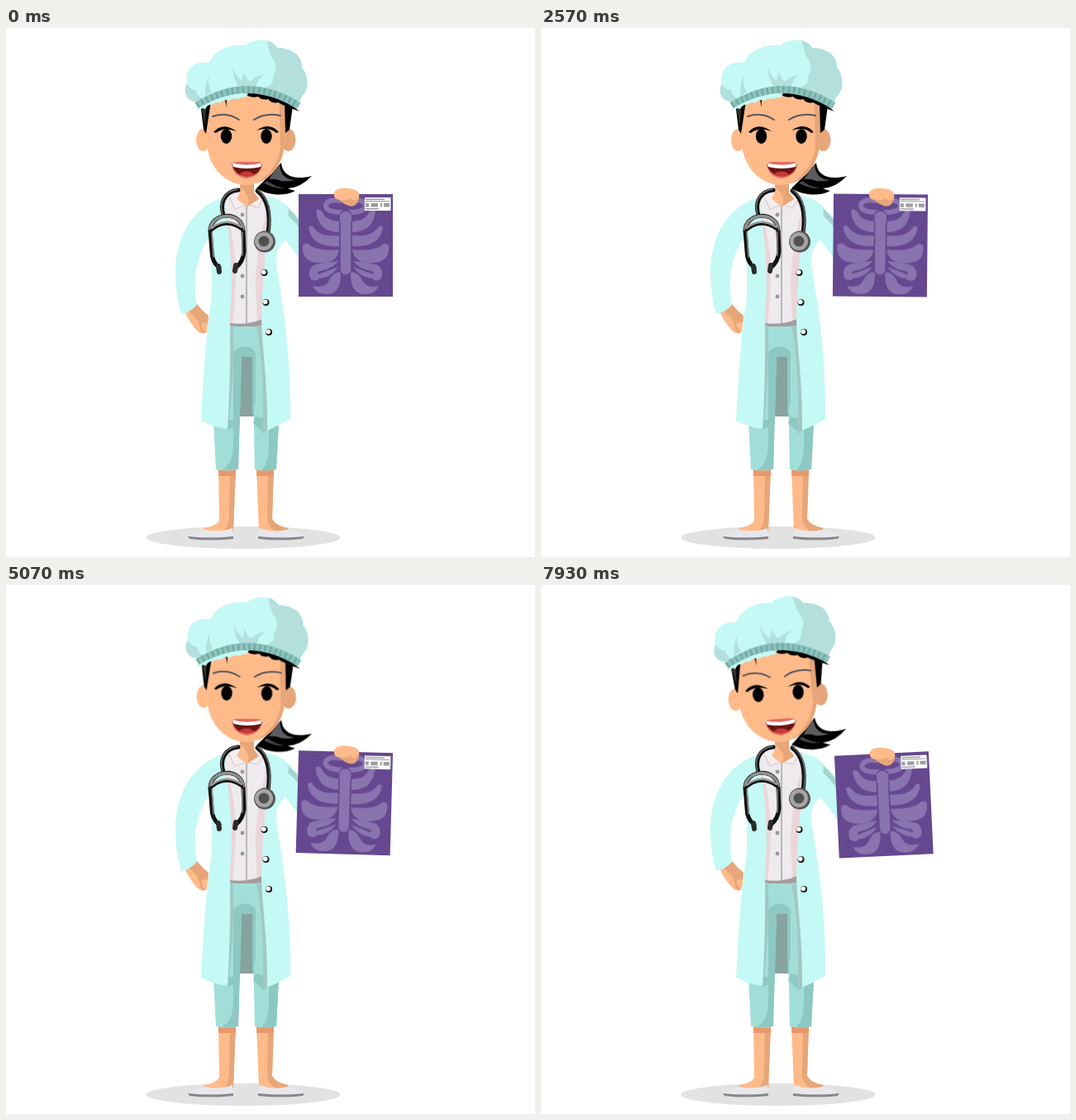
These frames come from a looping animation (640x640 px, 8000 ms). An HTML page without scripts:

```html
<!DOCTYPE html>
<html lang="en">
<head>
<meta charset="utf-8">
<title>Doctor with X-ray</title>
<style>
  html, body { margin: 0; width: 100%; height: 100%; overflow: hidden; background: #fff; }
  svg { display: block; width: 100vw; height: 100vh; }

  .skin { fill: #ffba8a; }
  .skin-dark { fill: #e6a679; }
  .coat { fill: #c4f9f5; }
  .coat-dark { fill: #a2c8c4; }
  .hat-dark { fill: #b3e0dc; }
  .pants { fill: #a2ded8; }
  .pants-dark { fill: #8dc8c2; }
  .line { fill: none; stroke-linecap: round; stroke-linejoin: round; }

  .head, .hold, .film { animation: 8s ease-in-out infinite; }
  .head { transform-origin: 290px 190px; animation-name: nod; }
  .hold { animation-name: lift; }
  .film { transform-origin: 411px 203px; animation-name: sway; }

  @keyframes nod {
    0% { transform: rotate(0deg); }
    18% { transform: rotate(-.55deg); }
    32% { transform: rotate(0deg); }
    53.6% { transform: rotate(.8deg); }
    66% { transform: rotate(.5deg); }
    84% { transform: rotate(-3.8deg); }
    100% { transform: rotate(-3.7deg); }
  }
  @keyframes lift {
    0% { transform: translate(0, 0); }
    14.5% { transform: translate(0, -3px); }
    30% { transform: translate(0, 0); }
    53.6% { transform: translate(0, 1px); }
    72.4% { transform: translate(0, .5px); }
    76% { transform: translate(0, 2.5px); }
    83% { transform: translate(0, -.5px); }
    92% { transform: translate(1px, -1px); }
    99.1%, 100% { transform: translate(1px, 3px); }
  }
  @keyframes sway {
    0% { transform: rotate(0deg); }
    13.5% { transform: rotate(-4.7deg); }
    31% { transform: rotate(.5deg); }
    40% { transform: rotate(1.2deg); }
    53.6% { transform: rotate(.5deg); }
    72.4% { transform: rotate(2.5deg); }
    76% { transform: rotate(3.6deg); }
    83% { transform: rotate(2.3deg); }
    94% { transform: rotate(-5.2deg); }
    99.1%, 100% { transform: rotate(-2.7deg); }
  }
</style>
</head>
<body>
<svg viewBox="0 0 640 640">
  <defs>
    <clipPath id="face-clip">
      <path d="M241 94C241 115 242 132 244 148C249 174 270 190 290 190C311 190 331 174 336 148C339 132 340 115 341 94C310 76 272 76 241 94Z"/>
    </clipPath>
    <clipPath id="mouth-clip">
      <path d="M273 163Q291 168 310 163Q308 178 291 179.500Q276 178 273 163Z"/>
    </clipPath>
    <clipPath id="hat-clip">
      <path id="hat" d="M231 96Q232 92 229 89C217 87 214 77 219 66C216 50 229 39 246 42C252 26 272 19 290 21C299 13 321 11 328 24C346 24 359 34 358 48C366 57 366 72 361 79Q355 85 353 96Q292 56 231 96Z"/>
    </clipPath>
    <g id="ribs">
      <path d="M404 209C392 206 386 212 387 216C389 222 398 223 407 223" class="line" stroke="#8a74b0" stroke-width="6"/>
      <g fill="#8a74b0">
        <path d="M375 221Q379 217 383 223Q388 234 405 234V247Q378 248 375 221Z"/>
        <path d="M366 241Q370 237 374 244Q382 253 404 251V264Q369 266 366 241Z"/>
        <path d="M359 263Q364 258 369 264Q380 270 403 268Q401 283 384 284Q357 286 359 263Z"/>
        <path d="M402 282Q385 283 372 287Q364 293 368 303Q374 308 379 303Q393 302 402 289Q391 293 378 298Q375 294 384 293Q395 291 402 282Z"/>
        <path d="M371 312Q386 316 391 305Q396 295 405 295Q406 322 388 322Q375 322 371 312Z"/>
      </g>
    </g>
  </defs>

  <ellipse cx="287" cy="616.500" rx="117.500" ry="13.500" fill="#e2e2e2"/>

  <!-- legs and shoes -->
  <g>
    <path class="skin" d="M257 533H278L275 609H239V605Q254 603 258 596Z"/>
    <path class="skin-dark" d="M271 533H278L275 609H264Q270 600 270 590Z"/>
    <path class="skin" d="M303 533H324L322 594Q326 602 341 605V609H306Z"/>
    <path class="skin-dark" d="M317 533H324L322 594Q326 602 341 605V609H326Q316 603 316 592Z"/>
    <path d="M257 533H278V542H257ZM303 533H324V542H303Z" fill="#e9986d"/>
    <path d="M221 615Q224 611 241 607Q258 611 274 605L275 617H221ZM360 615Q357 611 340 607Q323 611 306 605L305 617H360Z" fill="#e8e8ec"/>
    <path d="M220 615Q248 618 275 615V618Q247 621 222 618ZM361 615Q333 618 305 615V618Q333 621 359 618Z" fill="#86868a"/>
  </g>

  <!-- trousers -->
  <path d="M278 390H302V470H278Z" fill="#87a3a0"/>
  <path class="pants" d="M268 358H312L330 478L327 534Q314 537 301 534L298 398H285L281 534Q267 537 254 534L251 476L266 430Z"/>
  <path class="pants-dark" d="M275 420V396C276 382 302 382 302 396V450L298 470V398H285L281 534L261 535C272 528 274 520 275 505ZM330 478L327 534Q319 536 309 535C320 526 318 500 318 480Z"/>
  <path d="M250 477L268 486L283 480V474H252ZM330 477L312 490L299 478L302 470Z" class="pants-dark"/>

  <!-- raised arm -->
  <path class="coat" d="M318 204Q333 206 345 220L410 285L378 310L334 251Z"/>
  <path d="M337 215Q347 222 362 242V252Q350 234 340 226Z" fill="#a5d2cd"/>

  <!-- hand on hip -->
  <path class="skin" d="M216 343L231 334Q238 343 245 348L243 368Q237 372 231 366Q222 356 216 343Z"/>
  <path class="skin-dark" d="M218 341L231 334Q238 343 245 348L244 357Q238 354 236 360L241 369Q237 370 235 365Q234 350 218 341Z"/>

  <!-- shirt and neck -->
  <path d="M264 202H316L311 360H269Z" fill="#edebed"/>
  <path d="M264 212Q276 250 278 290Q278 325 274 360H268ZM315 222Q302 275 302 310L304 358H312Z" fill="#ebd5d8"/>
  <path d="M270 357Q292 360 310 352V361H270Z" fill="#a59b9d"/>
  <path d="M291 214V358" stroke="#aaa4a8" stroke-width="1.500"/>
  <g fill="#99979b">
    <circle cx="286" cy="226" r="2.400"/><circle cx="286" cy="300" r="2.400"/><circle cx="286" cy="325" r="2.400"/>
  </g>
  <path d="M282 196L270 203L277 219L291 214L305 217L313 203L300 196Z" fill="#f3edf0"/>
  <path d="M270 205L277 219L291 214L305 217L312 205" class="line" stroke="#ddc8cd" stroke-width="1.200"/>
  <path class="skin" d="M283 184H300V199Q304 204 306 207Q299 211 292 216Q283 211 279 206Q283 202 283 196Z"/>
  <path class="skin-dark" d="M283 184H300V199L306 207L292 216Q297 203 283 193Z"/>

  <!-- coat -->
  <path class="coat-dark" d="M269 360H275Q277 425 268 487ZM303 360H312L319 485L310 491Q314 420 303 360Z"/>
  <path class="coat" d="M264 205C232 213 204 247 205 298Q205 322 212 346Q222 345 231 335C226 310 228 280 246 252Q250 290 249 325C241 375 239 425 236 475Q251 483 268 485Q272 420 271 345C276 300 270 250 264 205Z"/>
  <path class="coat" d="M316 203Q331 206 342 220L338 256Q325 268 327 286C336 340 345 400 344 473Q330 481 316 487C317 430 309 380 309 350C310 300 318 250 316 203Z"/>
  <g fill="#111">
    <circle cx="312.500" cy="296" r="4"/><circle cx="314.500" cy="332" r="4"/><circle cx="318" cy="368" r="4"/>
  </g>
  <g fill="#fff">
    <circle cx="311.700" cy="295.300" r="2.900"/><circle cx="313.700" cy="331.300" r="2.900"/><circle cx="317.200" cy="367.300" r="2.900"/>
  </g>

  <!-- stethoscope -->
  <g class="line">
    <path d="M281 196C263 198 259 213 263 226M304 197C317 207 320 226 317 248" stroke="#111" stroke-width="5"/>
    <path d="M280 195C262 198 258 213 262 226M305 196C319 207 321 226 318 246" stroke="#777" stroke-width="1.300"/>
    <path d="M258 290Q249 283 249 270L247 245C248 222 286 221 287 245L288 270Q287 283 278 290" stroke="#111" stroke-width="5"/>
    <path d="M251 277L249 247M286 247L286 275" stroke="#8c8c8c" stroke-width="1.500"/>
    <path d="M247 243C250 223 284 222 287 243" stroke="#8f8f8f" stroke-width="3.600"/>
    <path d="M249 244Q266 230 285 243" stroke="#111" stroke-width="4"/>
    <path d="M249 242Q266 228 285 241" stroke="#999" stroke-width="2.500"/>
    <path d="M257 288L258 295M278 287L277 294" stroke="#2b2b2b" stroke-width="6"/>
  </g>
  <circle cx="313" cy="258.500" r="13" fill="#555"/>
  <circle cx="312" cy="258" r="11" fill="#a5a5a5"/>
  <circle cx="312" cy="258" r="6.500" fill="#505050"/>

  <!-- head -->
  <g class="head">
    <path d="M333 163C334 177 346 185 370 179Q357 193 341 194Q345 196 350 197C337 204 318 203 303 194L320 177Z"/>
    <path d="M331 165C332 178 338 183 350 184Q340 186 333 185Q327 182 318 183Z" fill="#5a5c5f"/>
    <path d="M316 185Q325 192 338 194L330 194Q320 192 312 188Z" fill="#444649"/>
    <ellipse class="skin" cx="238.500" cy="135.500" rx="8.500" ry="13.500"/>
    <ellipse class="skin-dark" cx="341.500" cy="135.500" rx="9" ry="13.500"/>
    <g clip-path="url(#face-clip)">
      <path class="skin" d="M230 70H350V195H230Z"/>
      <path class="skin-dark" d="M330 70H350V195H290Q327 178 332 145Z"/>
    </g>
    <path d="M236 98L248 88L242 128L239 123ZM337 88L347 94L343 123L338 127Z"/>
    <path d="M237 99L242 95L241 118Z" fill="#333"/>
    <path d="M286 77Q325 74 355 101L342 96Q334 93 329 90Q322 92 317 86Q310 88 305 83Q296 85 291 81Z"/>
    <path d="M264 84L267 96L267 83Z" fill="#3b2a24"/>
    <path d="M250 107Q267 101 282 111M300 111Q314 102 332 106" class="line" stroke="#55575a" stroke-width="2"/>
    <path d="M251 126Q262 113 279 125Q264 119 254 127ZM303 124Q319 113 330 126L327 127Q318 119 303 124Z"/>
    <ellipse cx="266.500" cy="131" rx="6.700" ry="9"/>
    <ellipse cx="315" cy="131" rx="6.700" ry="9"/>
    <path d="M273 163Q283 161 291 162Q300 161 310 163Q309 180 291 182Q274 180 273 163Z" fill="#e66b61"/>
    <g clip-path="url(#mouth-clip)">
      <path d="M270 160H312V184H270Z" fill="#671513"/>
      <ellipse cx="291" cy="178.500" rx="9" ry="5" fill="#c63a32"/>
      <path d="M272 161H311L308 168Q291 172 275 168Z" fill="#fff"/>
    </g>

    <use href="#hat" class="coat"/>
    <g clip-path="url(#hat-clip)">
      <path class="hat-dark" d="M313 10C319 20 316 28 324 39Q330 48 323 58Q325 68 314 72L360 98L375 20Z"/>
      <path class="hat-dark" d="M274 46Q276 57 285 64L288 53Q290 61 295 65Q302 58 313 56Q304 61 302 73H283Q274 61 274 46ZM247 55Q242 67 249 77L241 82Q240 67 247 55ZM218 67Q225 76 230 75Q231 82 237 85L230 92L213 82Z"/>
    </g>
    <path d="M231 94Q292 55 354 94" fill="none" stroke="#8cc3bd" stroke-width="9"/>
    <path d="M231 94Q292 55 354 94" fill="none" stroke="#72aaa5" stroke-width="8" stroke-dasharray="2.500 4"/>
    <path class="coat" d="M231 98Q259 80 293 79L290 84Q285 83 281 86Q275 84 270 88Q264 85 259 91Q254 88 250 93Q244 92 241 98Q235 96 231 100Z"/>
  </g>

  <!-- X-ray film -->
  <g class="hold">
    <g class="film">
      <path d="M354 201H468V325H354Z" fill="#65488f"/>
      <use href="#ribs"/>
      <use href="#ribs" transform="matrix(-1 0 0 1 822 0)"/>
      <path d="M411 228V292" class="line" stroke="#65488f" stroke-width="16"/>
      <path d="M411 228V292" class="line" stroke="#8a74b0" stroke-width="12.500"/>
      <path d="M404 226Q411 218 418 226V235H404Z" fill="#8a74b0"/>
      <path d="M434 205H465.500V221H434Z" fill="#fff"/>
      <path d="M435 206.500H458V208H435ZM435 209H464V210H435ZM435 212H439V216.500H435ZM441.500 212H450V216.500H441.500ZM453 212H455V216.500H453ZM457 212H464V216.500H457ZM435 218H451V219.500H435Z" fill="#9b9ba0"/>
    </g>
    <path class="skin" d="M397 200C398 193 411 193 419 195C427 196 429 202 426 209Q423 217 415 215Q409 213 405 208Q396 208 397 200Z"/>
    <path class="skin-dark" d="M427 204Q426 217 415 215Q408 213 403 208Q412 209 417 206Q422 212 427 204Z"/>
  </g>
</svg>
</body>
</html>
```
